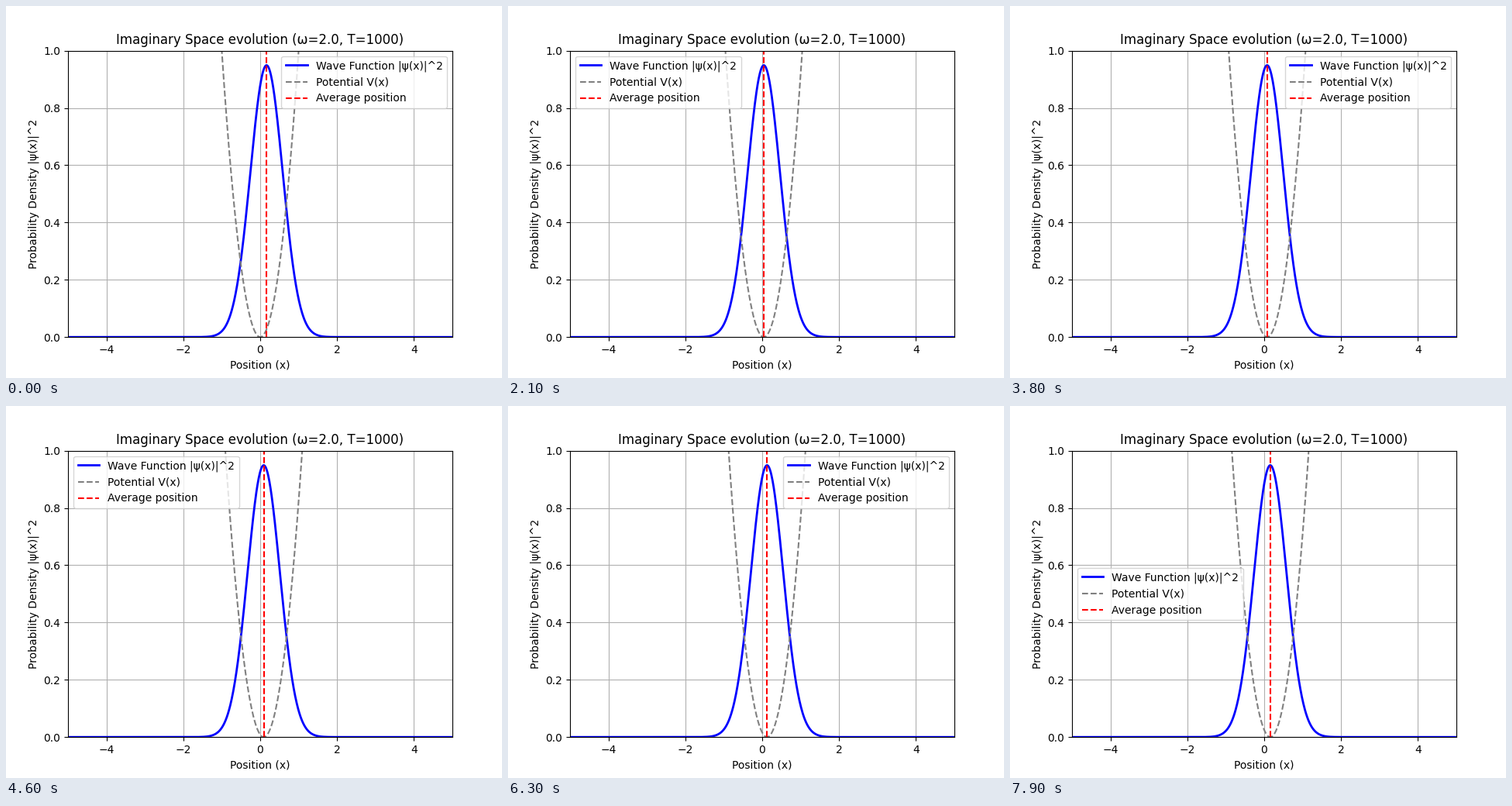
A matplotlib script that plays this animation: 640 px wide and 480 px high, repeating every 8000 ms.

```python
import numpy as np
import matplotlib.pyplot as plt
from matplotlib.animation import FuncAnimation

FRAMES = 80
STEP = 0.002          # trap displacement per frame
START = 0.165         # packet position before it settles in the trap
A = 2 * np.sqrt(2)    # inverse width of the density

x = np.linspace(-5, 5, 1001)


def density(center):
    return np.sqrt(A / np.pi) * np.exp(-A * (x - center) ** 2)


def potential(center):
    return (x - center) ** 2


fig, ax = plt.subplots(figsize=(6.4, 4.8), dpi=100)
wave, = ax.plot(x, density(START), color="blue", lw=2,
                label="Wave Function |ψ(x)|^2")
trap, = ax.plot(x, potential(0), color="gray", ls="--",
                label="Potential V(x)")
mean = ax.axvline(START, color="red", ls="--", label="Average position")

ax.set_xlim(-5, 5)
ax.set_ylim(0, 1)
ax.set_title("Imaginary Space evolution (ω=2.0, T=1000)")
ax.set_xlabel("Position (x)")
ax.set_ylabel("Probability Density |ψ(x)|^2")
ax.grid(True)
# "best" lets the legend hop between corners as the trap slides
ax.legend(loc="best")


def update(i):
    shift = STEP * i
    center = shift if i else START
    wave.set_ydata(density(center))
    trap.set_ydata(potential(shift))
    mean.set_xdata([center, center])
    return wave, trap, mean


anim = FuncAnimation(fig, update, frames=FRAMES, interval=100,
                     repeat=True, repeat_delay=0, blit=False)
plt.show()
```
